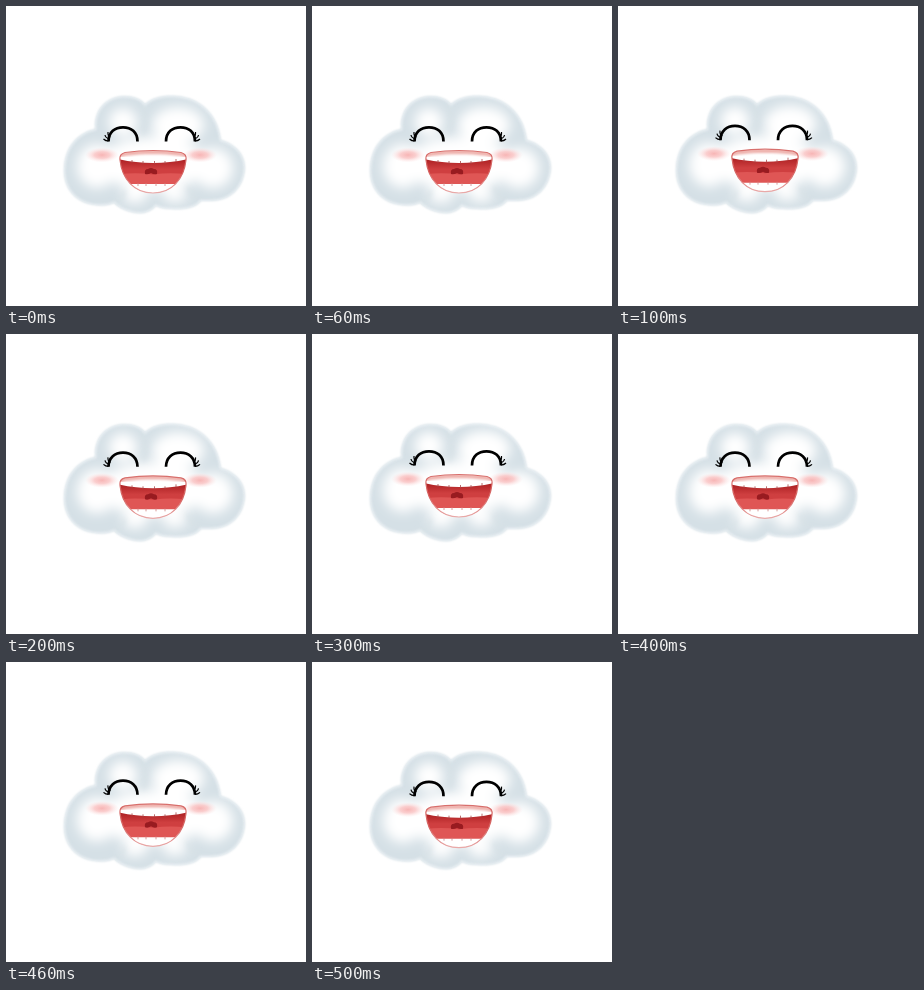
Write an HTML page that moves like this. It is 300 px wide and 300 px high and loops after 0.6 s.

```html
<!DOCTYPE html>
<html lang="en">
<head>
<meta charset="utf-8">
<title>Laughing cloud</title>
<style>
  html, body { margin: 0; width: 100%; height: 100%; overflow: hidden; background: #fff; }
  svg { display: block; width: 100vw; height: 100vh; }
</style>
</head>
<body>
<svg viewBox="0 0 300 300">
  <defs>
    <path id="body" d="M89 123C88 103 100 91 118 90C128 90 135 93 139 98C147 91 158 89 171 90C194 92 212 108 215 134C229 138 239 148 239 162C238 181 225 195 205 195C201 195 198 195 195 195C190 202 178 204 165 203C158 203 154 202 150 200C144 207 134 209 125 206C117 204 112 201 108 197C99 201 86 200 77 196C64 190 57 177 58 162C59 144 68 128 89 123Z"/>
    <path id="jaws" d="M119 146.500Q147 142.500 175 146.500Q181 148 180 154C178 173 166 187 147 187C128 187 116 173 114 154Q113 148 119 146.500Z"/>
    <clipPath id="inBody"><use href="#body"/></clipPath>
    <clipPath id="inJaws"><use href="#jaws"/></clipPath>
    <filter id="rim" x="-10%" y="-10%" width="120%" height="120%"><feGaussianBlur stdDeviation=".8"/></filter>
    <filter id="soft" x="-50%" y="-50%" width="200%" height="200%"><feGaussianBlur stdDeviation="6"/></filter>
    <filter id="haze" x="-50%" y="-50%" width="200%" height="200%"><feGaussianBlur stdDeviation="2.5"/></filter>
    <radialGradient id="blush">
      <stop offset="0" stop-color="#f7b5b5"/>
      <stop offset=".45" stop-color="#fac6c6" stop-opacity=".85"/>
      <stop offset="1" stop-color="#fde4e4" stop-opacity="0"/>
    </radialGradient>
    <linearGradient id="throat" x2="0" y2="1">
      <stop offset=".2" stop-color="#b02426"/>
      <stop offset=".6" stop-color="#cf3f40"/>
    </linearGradient>
    <linearGradient id="lip" x2="0" y2="1">
      <stop offset="0" stop-color="#d8706d"/>
      <stop offset=".5" stop-color="#d4605e"/>
      <stop offset="1" stop-color="#e9aaa9"/>
    </linearGradient>
    <g id="eye" fill="none" stroke="#000">
      <path d="M160 135.500C160 126 166.500 121.300 174.500 121.300S189 126 189 135.500" stroke-width="2.700"/>
      <path d="M187 131Q190 130 189.500 126M188 133Q192 132 192.500 129M189 135Q192 135 194 133" stroke-width="1.200"/>
    </g>
  </defs>

  <use href="#body" fill="#d5e0e6" filter="url(#rim)"/>
  <g clip-path="url(#inBody)">
    <g id="light" fill="#fff" filter="url(#soft)">
      <ellipse cx="117" cy="116" rx="14" ry="14"/>
      <ellipse cx="172" cy="119" rx="26" ry="18"/>
      <ellipse cx="91" cy="160" rx="20" ry="22"/>
      <ellipse cx="207" cy="162" rx="20" ry="20"/>
      <ellipse cx="147" cy="158" rx="54" ry="27"/>
      <ellipse cx="129" cy="189" rx="12" ry="8"/>
      <ellipse cx="169" cy="189" rx="12" ry="7"/>
    </g>
    <g fill="none" stroke="#d8e2e7" stroke-width="3.500" stroke-linecap="round" filter="url(#haze)">
      <path d="M136 97Q143 109 138 126M108 198Q117 194 118 186M191 192Q184 189 183 182" opacity=".8"/>
    </g>
    <use href="#body" fill="none" stroke="#e8eff3" stroke-width="4" opacity=".6" filter="url(#rim)"/>
  </g>

  <g id="face">
    <ellipse cx="96" cy="149" rx="17" ry="7.500" fill="url(#blush)"/>
    <ellipse cx="194" cy="149" rx="17" ry="7.500" fill="url(#blush)"/>
    <use href="#eye"/>
    <use href="#eye" transform="translate(291.500 0) scale(-1 1)"/>
    <g clip-path="url(#inJaws)">
      <path d="M110 150H184V172H110Z" fill="url(#throat)"/>
      <path d="M112 168.500Q129 166 147 168.500Q165 166 182 168.500V190H112Z" fill="#df5655"/>
      <path d="M139 168Q138 163 142 163Q145 161 148 163Q152 163 151 168Q148 169 145 167Q142 169 139 168Z" fill="#981b20"/>
      <path d="M112 143H182V153Q147 161 112 153Z" fill="#fff"/>
      <path d="M126 154V157M137 155V158M148.500 155V158M159 155V158M170 153V156" stroke="#a94a4a" stroke-width=".8"/>
      <path d="M112 178H182V190H112Z" fill="#fff"/>
      <path d="M132 177V180M140 177V180M150 177V180M159 177V180" stroke="#d08080" stroke-width=".8"/>
      <path d="M113 150Q117 147 147 146Q177 147 181 150" fill="none" stroke="#eeb0ab" stroke-width="4" filter="url(#rim)"/>
    </g>
    <use href="#jaws" fill="none" stroke="url(#lip)" stroke-width="1.200"/>
  </g>
</svg>
<script>
  const face = document.getElementById("face");
  const light = document.getElementById("light");

  // The face hops up three steps and back down, with the highlights following.
  function draw(now) {
    const step = Math.floor(now / 100) % 6;
    const rise = (3 - Math.abs(step - 3)) * 4 / 3;
    const shift = `translate(0 ${-rise})`;
    face.setAttribute("transform", shift);
    light.setAttribute("transform", shift);
    requestAnimationFrame(draw);
  }
  draw(performance.now());
</script>
</body>
</html>
```
